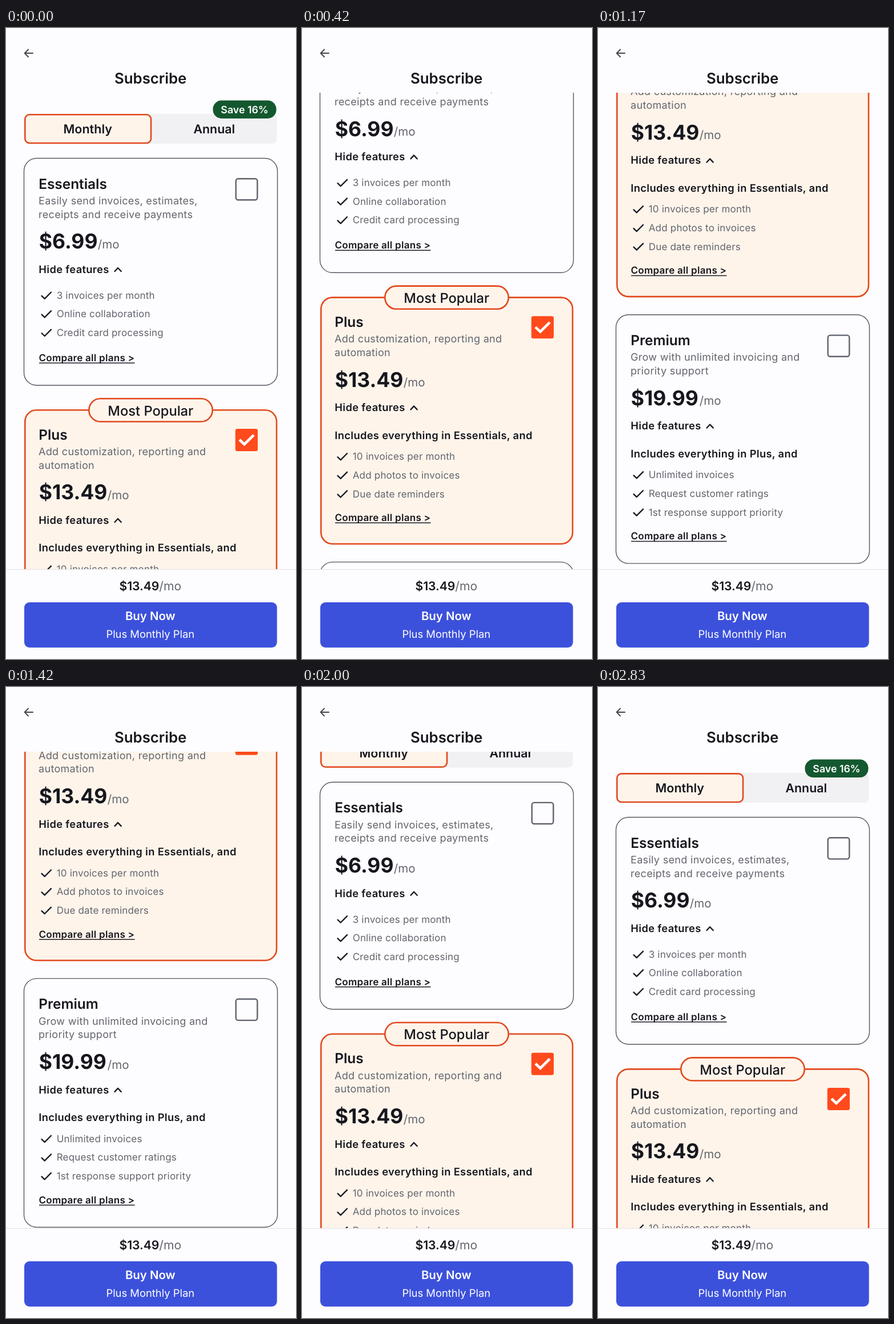
An HTML page that plays this animation: 508x1102 px, repeating every 2910 ms.

```html
<!DOCTYPE html>
<html lang="en">
<head>
<meta charset="utf-8">
<title>Subscribe</title>
<style>
  html, body { margin: 0; width: 100%; height: 100%; overflow: hidden; background: #fdfcfe; }
  svg { display: block; width: 508px; height: 1102px; }
  text { font-family: Inter, "Noto Sans", sans-serif; font-optical-sizing: none;
         text-rendering: geometricPrecision; fill: #16171e; font-weight: 600; }
  .mid { text-anchor: middle; }
  .soft { fill: #62656e; font-weight: 400; }
  .bold { font-weight: 700; }
  .light { fill: #fff; }
  .line { fill: none; stroke: #1a1c28; stroke-width: 2.4; stroke-linecap: round; stroke-linejoin: round; }
  .plain { fill: #fdfcfe; stroke: #565a64; stroke-width: 1.4; }
  .accent { fill: #fef4ea; stroke: #e2491d; stroke-width: 2.6; }
</style>
</head>
<body>
<svg viewBox="0 0 508 1102"></svg>
<script>
const svg = document.querySelector('svg');

const text = (x, y, size, str, cls = '', extra = '') =>
  `<text x="${x}" y="${y}" font-size="${size}" class="${cls}" ${extra}>${str}</text>`;
const box = (x1, y1, x2, y2, r, attrs) =>
  `<rect x="${x1}" y="${y1}" width="${x2 - x1}" height="${y2 - y1}" rx="${r}" ${attrs}/>`;
const line = (points, attrs = '') => `<polyline class="line" points="${points}" ${attrs}/>`;

const checkbox = on => on
  ? box(401.7, 262, 441, 301, 3.5, 'fill="#ff4a1c"') +
    line('409 281 417.5 289 434 272.8', 'style="stroke:#fff;stroke-width:4.6;stroke-linecap:butt;stroke-linejoin:miter"')
  : box(402.7, 263.2, 440.3, 300.3, 4, 'fill="none" stroke="#5f636e" stroke-width="2.4"');

function feature(str, y) {
  return line(`62.5 ${y - 5} 67.7 ${y} 79 ${y - 11.3}`) + text(88.7, y, 17, str, 'soft', 'letter-spacing=".19"');
}

function plan({ dy, name, desc, price, moX, includes, features, on }) {
  const start = includes ? 513 : 472.8;
  const link = includes ? 620 : 582;
  return `<g transform="translate(0 ${dy})">` +
    text(57.2, 280.5, 24.4, name) + checkbox(on) +
    desc.map((s, i) => text(57, 308 + i * 23.5, 18, s, 'soft', 'letter-spacing=".32"')).join('') +
    text(57.7, 385.3, 35.5, price, 'bold') + text(moX, 385, 20.5, '/mo', 'soft') +
    text(57.3, 428, 18.3, 'Hide features', '', 'letter-spacing=".35"') +
    line('190.5 425 196 419 201.7 425') +
    (includes ? text(57.3, 476.2, 18.3, `Includes everything in ${includes}, and`, '', 'letter-spacing=".35"') : '') +
    features.map((s, i) => feature(s, start + i * 32.6)).join('') +
    text(57.5, link, 17, 'Compare all plans &gt;', '', 'letter-spacing=".27"') +
    `<path d="M58 ${link + 3}H225.5" stroke="#1a1c28" stroke-width="1.6"/></g>`;
}

const tabs =
  box(32, 150, 474.5, 202, 8, 'fill="#f1f0f3"') +
  box(33.3, 151.3, 254, 201, 8, 'class="accent"') +
  text(143.2, 184.2, 21.5, 'Monthly', 'mid') +
  text(364.8, 184.2, 21.3, 'Annual', 'mid') +
  box(362.5, 126.5, 473.5, 158, 15, 'fill="#14582f"') +
  text(418, 148.7, 17.8, 'Save 16%', 'mid light');

const cards =
  box(31.5, 227.5, 475.5, 624, 22, 'class="plain"') +
  plan({ dy: 0, name: 'Essentials', price: '$6.99', moX: 160.8,
    desc: ['Easily send invoices, estimates,', 'receipts and receive payments'],
    features: ['3 invoices per month', 'Online collaboration', 'Credit card processing'] }) +
  box(33.3, 667.3, 474, 1097.7, 20, 'class="accent"') +
  box(145.3, 647.3, 361.7, 687.5, 20, 'class="accent"') +
  text(253.3, 676.6, 23.7, 'Most Popular', 'mid', 'style="font-weight:500"') +
  plan({ dy: 438, name: 'Plus', price: '$13.49', moX: 177.8, includes: 'Essentials', on: true,
    desc: ['Add customization, reporting and', 'automation'],
    features: ['10 invoices per month', 'Add photos to invoices', 'Due date reminders'] }) +
  box(31.5, 1129.3, 475.5, 1563.7, 22, 'class="plain"') +
  plan({ dy: 902, name: 'Premium', price: '$19.99', moX: 177.8, includes: 'Plus',
    desc: ['Grow with unlimited invoicing and', 'priority support'],
    features: ['Unlimited invoices', 'Request customer ratings', '1st response support priority'] });

const header =
  box(0, 0, 508, 113, 0, 'fill="#fdfcfe"') +
  line('39 37.5 32.7 44 39 50.5', 'style="stroke:#45464d;stroke-width:1.9"') +
  line('33 44 47 44', 'style="stroke:#45464d;stroke-width:1.9"') +
  text(253.2, 97, 25.8, 'Subscribe', 'mid');

const footer =
  box(0, 945, 508, 1102, 0, 'fill="#fdfcfe"') +
  box(0, 945, 508, 946.2, 0, 'fill="#e4e3e8"') +
  text(252.8, 982, 21.1, '$13.49<tspan class="soft">/mo</tspan>', 'mid') +
  box(32, 1003, 474.7, 1082, 9, 'fill="#3c51db"') +
  text(252.8, 1034.2, 20.4, 'Buy Now', 'mid light') +
  text(252.8, 1065, 18.4, 'Plus Monthly Plan', 'mid light', 'style="font-weight:400"');

svg.innerHTML = `<g id="page">${tabs}${cards}</g>${header}${footer}`;
const page = document.getElementById('page');

const LOOP = 2910, RANGE = 625.7, SPEED = 1.17, DAMPING = 0.0132;

// Finger speeds up for `ramp` ms, page coasts to the end and bounces back.
function fling(t, ramp) {
  if (t < 0) return 0;
  if (t < ramp) return SPEED * t * t / (2 * ramp);
  const over = t - ramp / 2 - RANGE / SPEED;
  return RANGE + SPEED * over * (over < 0 ? 1 : Math.exp(-DAMPING * over));
}

function draw(now) {
  const step = Math.floor((now % LOOP + 3.4) * 12 / 1000);
  const t = Math.round(step * 100 / 12) * 10;
  const scroll = fling(t - 84.4, 335) - fling(t - 1365.6, 304);
  page.setAttribute('transform', `translate(0 ${-scroll.toFixed(2)})`);
  requestAnimationFrame(draw);
}
draw(performance.now());
</script>
</body>
</html>
```
